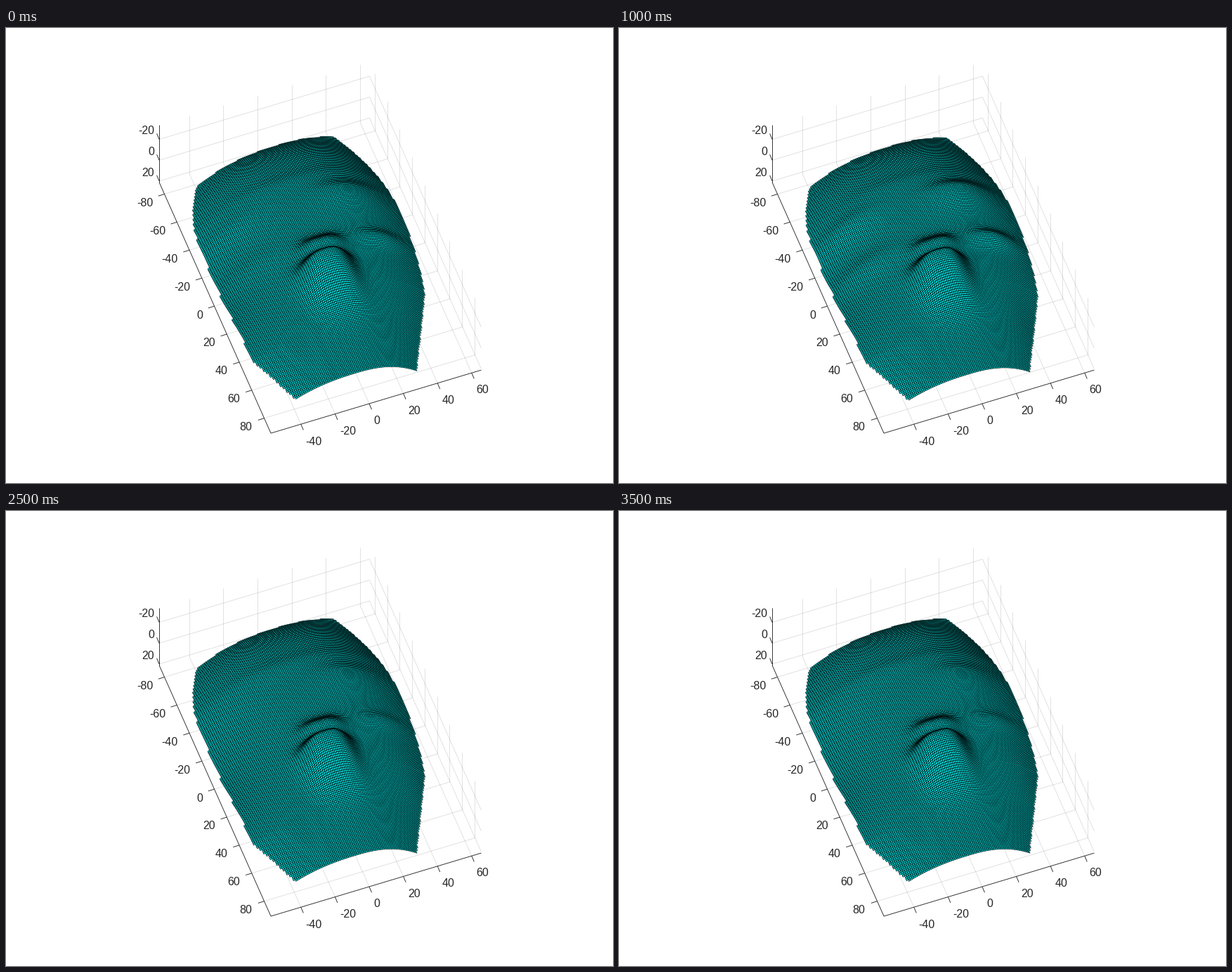
Recreate the animation shown at these times as a matplotlib script. Size 864 px wide and 648 px high, loop 4000 ms.

```python
import numpy as np
import matplotlib.pyplot as plt
from matplotlib.animation import FuncAnimation
from matplotlib.collections import LineCollection, PolyCollection

W, H = 864, 648
FRAMES, INTERVAL = 8, 500
INK = (0.15, 0.15, 0.15)
X0, X1, Y0, Y1, Z0, Z1 = -57.6, 65.6, -88.4, 90.7, -34, 21.2


def project(x, y, z):
    """Orthographic view: data to pixels, z pointing down."""
    px = 436.5 + 2.43 * x + 0.8875 * y
    py = 322.6 - 0.73 * x + 1.995 * y + 1.485 * z
    return np.stack(np.broadcast_arrays(px, py), axis=-1)


def left_edge(y):
    temple = 0.008 * np.clip(-40 - y, 0, None) ** 2
    return np.maximum(-54.5 - 0.045 * y + temple, -57.3 + 0.39 * (y - 58))


def right_edge(y):
    side = 59 - np.where(y < -22, 0.0046, 0.002) * (y + 22) ** 2
    return np.minimum(side, 53.3 - 0.445 * (y - 32))


def inside(x, y):
    return (x > left_edge(y)) & (x < right_edge(y)) & (y > -79.8 - 0.08 * x)


def head(x, y):
    """Smooth mask: a middle profile that bends down to both sides."""
    lo, hi = left_edge(y), right_edge(y)
    u = np.clip((2 * x - lo - hi) / (hi - lo), -1.1, 1.1)
    middle = -13 + 22 * np.exp(-(y + 81) / 25)
    left = 7 - 12.5 * np.tanh((y - 21) / 32)
    right = np.minimum(20.5, 20.5 - 0.31 * (y - 33))
    side = np.where(u < 0, left, right)
    return middle + (side - middle) * np.abs(u) ** 2.4


def bump(x, y, cx, cy, wide, above, below, power=2):
    tall = np.where(y < cy, above, below)
    return np.exp(-np.abs((x - cx) / wide) ** power - ((y - cy) / tall) ** 2)


def surface(x, y, s):
    """Height of the face; s swings between -1 and 1."""
    z = head(x, y) + s
    z -= 22 * bump(x, y, -1, 23, 14.5, 8.5, 21, power=3)        # nose
    z -= 9 * bump(x, y, 2, 7, 13, 7, 7, power=3)                # bridge
    z -= (4 + 2 * s) * bump(x, y, 30, -31, 18, 7, 14)           # right brow
    z -= (1.6 + 1.6 * s) * bump(x, y, -36, -33, 20, 7, 9)       # left brow
    z -= (3 + 1.6 * s) * bump(x, y, 38, 3, 13, 5, 7)            # right eye
    z -= (1 + 1.4 * s) * bump(x, y, -35, -2, 20, 7, 9)          # left eye
    z -= 1.2 * bump(x, y, 0, -45, 50, 6, 8)                     # forehead
    z += 1.5 * s * bump(x, y, 45, 50, 12, 25, 25)               # right cheek
    return z


# Unit cells inside the rim, sorted back to front
gx, gy = np.meshgrid(np.arange(-60.0, 67), np.arange(-90.0, 93))
fx, fy = gx.ravel(), gy.ravel()
rows, cols = gx.shape
corner = (np.arange(rows - 1)[:, None] * cols + np.arange(cols - 1)).ravel()
corner = corner[inside(fx[corner] + 0.5, fy[corner] + 0.5)]
corner = corner[np.argsort(1.995 * fy[corner] - 0.73 * fx[corner],
                           kind="stable")]
quads = corner[:, None] + np.array([0, 1, cols + 1, cols])

fig = plt.figure(figsize=(W / 72, H / 72), dpi=72, facecolor="white")
ax = fig.add_axes([0, 0, 1, 1])
ax.set_xlim(0, W)
ax.set_ylim(H, 0)
ax.axis("off")


def seg(a, b):
    return [project(*a), project(*b)]


def tick(p, dx, dy):
    start = project(*p)
    return [start, start + (dx, dy)]


def label(x, y, value, ha):
    ax.text(x, y, str(value), ha=ha, va="center", color=INK,
            fontsize=16, family="Liberation Sans")


grid = []
lines = [seg((X0, Y1, Z1), (X1, Y1, Z1)),
         seg((X0, Y0, Z1), (X0, Y1, Z1)),
         seg((X0, Y0, Z0), (X0, Y0, Z1))]
for v in range(-40, 61, 20):
    grid += [seg((v, Y0, Z0), (v, Y0, Z1)), seg((v, Y0, Z1), (v, Y1, Z1))]
    lines.append(tick((v, Y1, Z1), 3.5, 8.3))
    label(426.5 + 2.425 * (v + 40), 589 - 0.73 * (v + 40), v, "left")
for v in range(-80, 81, 20):
    grid += [seg((X1, v, Z0), (X1, v, Z1)), seg((X0, v, Z1), (X1, v, Z1))]
    lines.append(tick((X0, v, Z1), -8.7, 2.7))
    label(209.5 + 0.88 * (v + 80), 250 + 1.988 * (v + 80), v, "right")
for v in (-20, 0, 20):
    grid += [seg((X0, Y0, v), (X1, Y0, v)), seg((X1, Y0, v), (X1, Y1, v))]
    lines.append(tick((X0, Y0, v), -3.5, -8.2))
    label(211, 176.5 + 1.485 * v, v, "right")

ax.add_collection(LineCollection(grid, colors=[INK + (0.15,)],
                                 linewidths=0.9, zorder=1))
ax.add_collection(LineCollection(lines, colors=[INK], linewidths=0.9, zorder=2))

sheet = PolyCollection([], facecolors="#00f0f0", edgecolors="black",
                       linewidths=0.6, joinstyle="round", zorder=3)
ax.add_collection(sheet)


def draw(i):
    s = np.sin(2 * np.pi * i / FRAMES)
    points = project(fx + 0.8, fy - 0.7, surface(fx, fy, s))
    sheet.set_verts(points[quads])
    return [sheet]


anim = FuncAnimation(fig, draw, frames=FRAMES, init_func=lambda: draw(0),
                     interval=INTERVAL, repeat=True)
plt.show()
```
